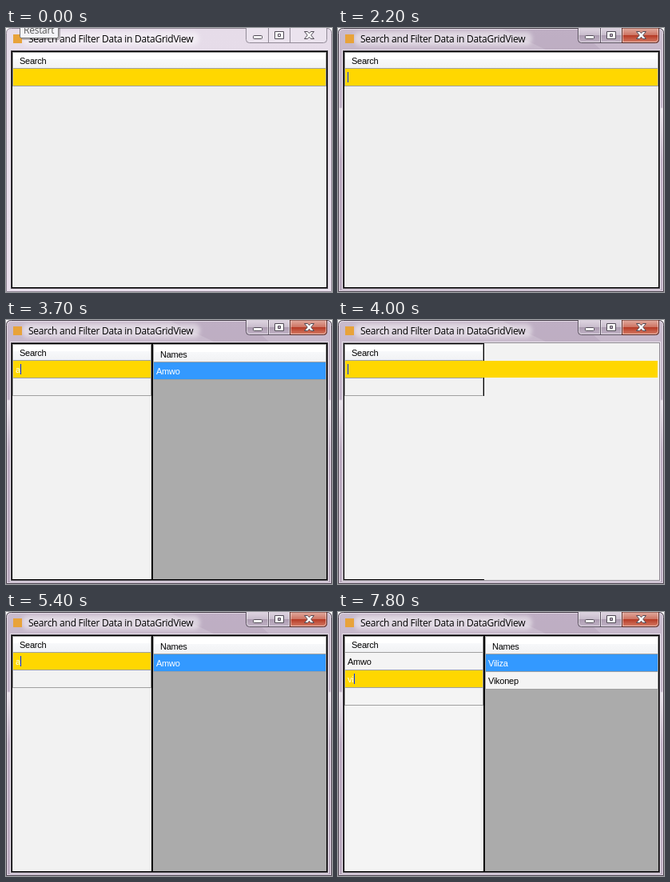
An HTML page for the animation above (8000 ms loop, 408 by 330 pixels).

```html
<!DOCTYPE html>
<html lang="en">
<head>
<meta charset="utf-8">
<title>Search and Filter</title>
<style>
  html, body { margin: 0; width: 100%; height: 100%; overflow: hidden; background: #fff; }
  svg { display: block; }
  text { font: 11px "Liberation Sans", Arial, sans-serif; letter-spacing: -.25px; white-space: pre; }
  .title { font: 12px "Open Sans", "Noto Sans", sans-serif; }
  .idle { animation: idle 8s step-end infinite; }
  .active { animation: active 8s step-end infinite; }
  .tip { animation: tip 8s step-end infinite; }
  @keyframes idle { 0% { visibility: visible } 15%, 100% { visibility: hidden } }
  @keyframes active { 0% { visibility: hidden } 15%, 100% { visibility: visible } }
  @keyframes tip {
    0% { opacity: 1 } 6.25% { opacity: .8 } 7.5% { opacity: .6 }
    8.75% { opacity: .4 } 10% { opacity: .2 } 11.25%, 100% { opacity: 0 }
  }
</style>
</head>
<body>
<svg width="408" height="330" viewBox="0 0 408 330">
  <defs>
    <linearGradient id="glass" x2="0" y2="1">
      <stop offset="0" stop-color="#c9bbcd"/>
      <stop offset=".3" stop-color="#c1b2c7"/>
      <stop offset=".305" stop-color="#ebe5ed"/>
      <stop offset=".5" stop-color="#bbaac0"/>
      <stop offset="1" stop-color="#b9a9be"/>
    </linearGradient>
    <linearGradient id="pale" x2="0" y2="1">
      <stop offset="0" stop-color="#e6dce9"/>
      <stop offset="1" stop-color="#e9dfec"/>
    </linearGradient>
    <linearGradient id="btn" x2="0" y2="1">
      <stop offset="0" stop-color="#ded5e1"/>
      <stop offset=".48" stop-color="#c9bdcd"/>
      <stop offset=".5" stop-color="#ab9bb0"/>
      <stop offset="1" stop-color="#c3b5c8"/>
    </linearGradient>
    <linearGradient id="red" x2="0" y2="1">
      <stop offset="0" stop-color="#e3aca0"/>
      <stop offset=".48" stop-color="#cd7463"/>
      <stop offset=".5" stop-color="#b53a25"/>
      <stop offset="1" stop-color="#d8806a"/>
    </linearGradient>
    <linearGradient id="head" x2="0" y2="1">
      <stop offset=".42" stop-color="#fff"/>
      <stop offset=".45" stop-color="#f7f8fa"/>
      <stop offset="1" stop-color="#f1f2f4"/>
    </linearGradient>
    <filter id="blur" x="-20%" y="-80%" width="140%" height="260%"><feGaussianBlur stdDeviation="2.500"/></filter>
    <path id="frame" d="M.5 329.5V6.5Q.5.5 6.5.5H401.5Q407.5.5 407.5 6.5V329.5Z"/>
    <path id="bar" d="M300.500 0V14.500Q300.500 18.500 304.500 18.500H397.500Q401.500 18.500 401.500 14.500V0"/>
    <g id="glyphs" fill="#fff" stroke="#514b56">
      <rect x="309.500" y="9.500" width="11" height="4" rx="1"/>
      <path fill-rule="evenodd" d="M336.500 4.500H347.500V13.500H336.500ZM340.500 7.500V10.500H343.500V7.500Z"/>
      <path d="M373.500 4.500H377.500L379.500 6.700 381.500 4.500H385.500L381.700 9 385.500 13.500H381.500L379.500 11.300 377.500 13.500H373.500L377.300 9Z"/>
    </g>
  </defs>

  <g class="idle">
    <use href="#frame" fill="url(#pale)" stroke="#8f8593"/>
    <rect x="20" y="5" width="222" height="17" rx="8" fill="#fff" opacity=".45" filter="url(#blur)"/>
    <use href="#bar" fill="#ebe3ee" stroke="#928a97"/>
    <path d="M328.500 0V18M355.500 0V18" stroke="#928a97"/>
    <use href="#glyphs"/>
  </g>

  <g class="active">
    <use href="#frame" fill="url(#glass)" stroke="#443c48"/>
    <path d="M205 1H300L330 28H262Z" fill="#ab99b1" opacity=".35"/>
    <path d="M1.500 328.500V7Q1.500 1.500 7 1.500H401Q406.500 1.500 406.500 7V328.500Z" fill="none" stroke="#ece6ee" opacity=".75"/>
    <rect x="20" y="5" width="223" height="17" rx="8" fill="#fff" opacity=".45" filter="url(#blur)"/>
    <use href="#bar" fill="url(#btn)" stroke="#5c5261"/>
    <path d="M355.500 0H401.500V14.500Q401.500 18.500 397.500 18.500H355.500Z" fill="url(#red)" stroke="#5b2a24"/>
    <path d="M328.500 0V18" stroke="#5c5261"/>
    <path d="M301.500 1V14Q302 17.500 305 17.500H327.500V1M329.500 1V17.500H354.500V1M356.500 1V17.500H397Q400.500 17 400.500 14V1" fill="none" stroke="#fff" opacity=".5"/>
    <use href="#glyphs"/>
  </g>

  <rect x="9" y="8" width="11" height="11" fill="#e8a33a"/>
  <text class="title" x="28" y="18">Search and Filter Data in DataGridView</text>
  <g class="tip">
    <rect x="19" y="-5" width="49" height="20" rx="3" opacity=".25"/>
    <rect x="17.500" y="-6.500" width="48" height="19" rx="2" fill="#f4f4f8" stroke="#767676"/>
    <text class="title" x="22" y="7" fill="#575757">Restart</text>
  </g>
  <rect x="5.500" y="27.500" width="398" height="299" fill="none" stroke="#e9e3ec"/>
  <g id="client"></g>
</svg>

<script>
const GOLD = '#ffd700', BLUE = '#3399ff', LINE = '#a0a0a0', GREY = '#ababab';
const names = { a: ['Amwo'], v: ['Viliza', 'Vikonep'] };

// [start, view, typed text, caret x (0 = hidden)]
const steps = [
  [0, 'empty', '', 0],
  [1200, 'empty', '', 12],
  [1700, 'empty', '', 0],
  [2200, 'empty', '', 12],
  [2400, 'list', 'a', 18],
  [2800, 'list', 'am', 26],
  [3300, 'list', 'am', 0],
  [3700, 'list', 'a', 18],
  [4000, 'half', '', 12],
  [4100, 'empty', '', 12],
  [4600, 'empty', '', 0],
  [5100, 'empty', '', 12],
  [5400, 'list', 'a', 18],
  [5600, 'list', 'am', 26],
  [6200, 'list', 'am', 0],
  [6400, 'done', '', 0],
  [7600, 'list', 'v', 17],
  [7800, 'list', 'vi', 20]
];

const rect = (x, y, w, h, fill) => `<rect x="${x}" y="${y}" width="${w}" height="${h}" fill="${fill}"/>`;
const text = (x, y, s, fill = '#000') => `<text x="${x}" y="${y}" fill="${fill}">${s}</text>`;

// Cells share grey lines on the left, right and bottom.
const cell = (x, y, w, h, fill) => rect(x, y, w, h + 1, LINE) + rect(x + 1, y, w - 2, h, fill);
const row = (x, y, w, fill) => cell(x, y, w, 21, fill);
const header = (x, y, w, label) =>
  rect(x, 30, w, 1, LINE) + cell(x, 31, w, y - 31, 'url(#head)') + text(x + 9, y - 5, label);

function border(view, bg) {
  if (view !== 'half') {
    return rect(6, 28, 397, 298, '#4a444d') + rect(7, 29, 395, 296, '#000') + rect(8, 30, 393, 294, bg);
  }
  return rect(6, 28, 397, 298, '#8d8790') + rect(7, 29, 395, 296, bg) +
    rect(7, 29, 1, 296, '#000') + rect(7, 29, 176, 1, '#000') + rect(7, 324, 176, 1, '#000');
}

function results(found) {
  let out = rect(182, 29, 2, 296, '#000') + rect(184, 30, 217, 294, GREY) + header(184, 52, 217, 'Names');
  found.forEach((name, i) => {
    const y = 53 + 22 * i;
    out += row(184, y, 217, i ? '#f4f4f4' : BLUE) + text(188, y + 15, name, i ? '#000' : '#fff');
  });
  return out;
}

function render([start, view, typed, caret]) {
  const narrow = view === 'list' || view === 'half';
  const second = typed[0] === 'v';
  const bg = second ? '#f4f4f4' : narrow ? '#f2f2f2' : view === 'empty' ? '#efefef' : '#f0f0f0';
  const w = narrow ? 174 : 393;
  const y = second ? 73 : 51;
  let out = border(view, bg) + header(8, 50, w, 'Search');

  if (view === 'done' || second) out += row(8, 51, w, bg) + text(12, 66, names.a[0]);
  out += row(8, y, w, GOLD);
  if (view === 'done') out += row(8, 73, w, BLUE);
  if (narrow) out += row(8, y + 22, w, bg);
  if (view === 'half') out += rect(182, 29, 1, 66, '#000') + rect(9, 51, 391, 21, GOLD);
  if (view === 'done') out += row(8, 51, w, bg) + text(12, 66, names.a[0]);
  if (view === 'list') out += results(names[typed[0]]);
  if (typed) out += text(12, y + 15, typed, '#fff');
  if (caret) out += rect(caret, y + 4, 1, 13, '#0028ff');
  return out;
}

const client = document.getElementById('client');
const anims = document.getAnimations();
let shown;

function tick() {
  const t = performance.now() % 8000;
  anims.forEach(a => { a.currentTime = t; });
  const step = steps.findLast(s => s[0] <= t);
  if (step !== shown) client.innerHTML = render(shown = step);
  requestAnimationFrame(tick);
}
tick();
</script>
</body>
</html>
```
